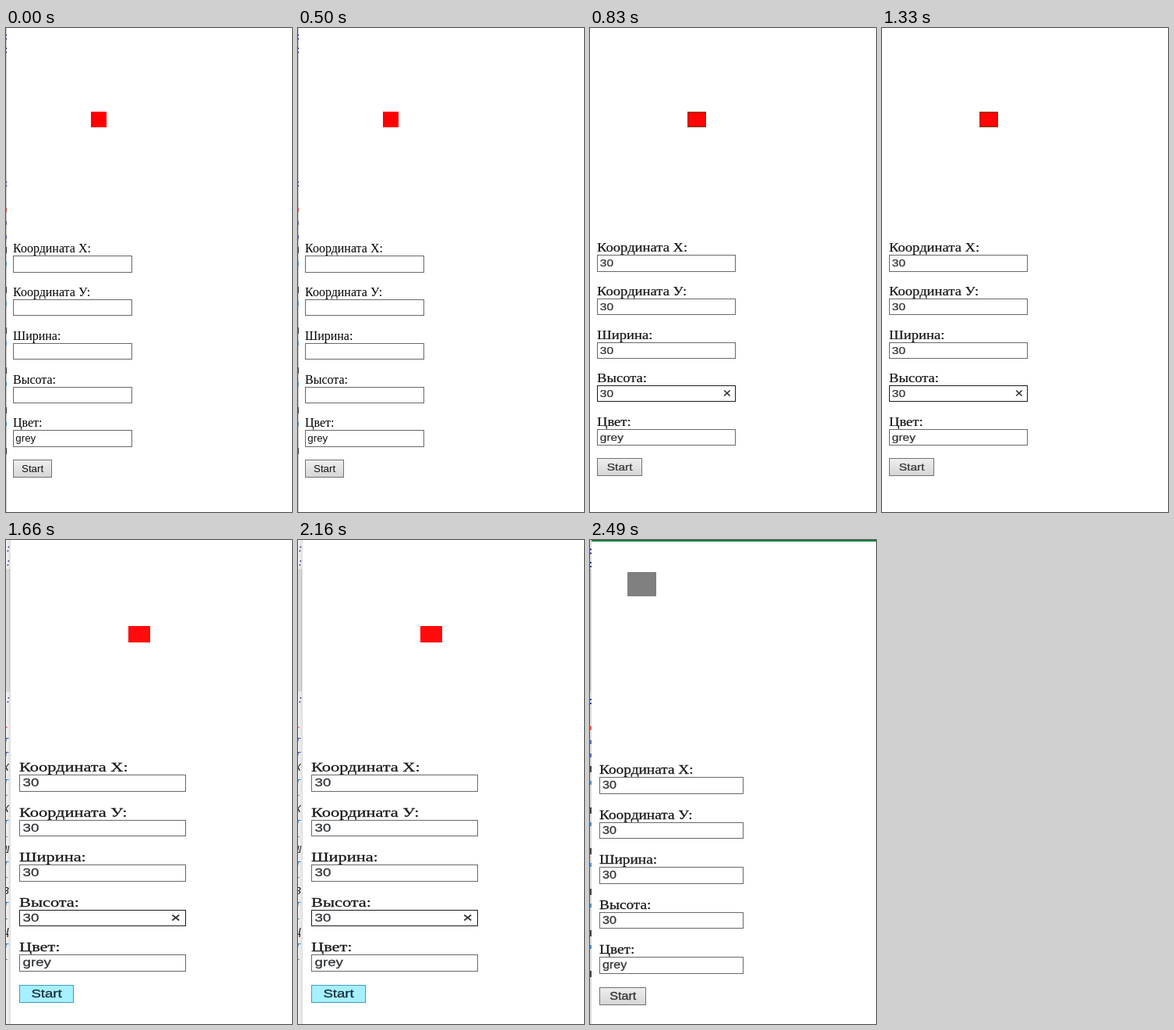
These frames come from a looping animation (367 by 619 pixels, 3.32 s). An HTML page:

```html
<!DOCTYPE html>
<html lang="ru">
<head>
<meta charset="utf-8">
<style>
html, body { margin: 0; width: 100%; height: 100%; overflow: hidden; background: #fff; }
svg { display: block; width: 100%; height: 100%; }
rect, line { shape-rendering: crispEdges; }
.label { font: 16px "Liberation Serif", "Times New Roman", serif; }
.value { font: 13.33px "Liberation Sans", Arial, sans-serif; }
.code { font: italic 13px "Liberation Mono", monospace; }
</style>
</head>
<body>
<svg id="stage" viewBox="0 0 367 619"></svg>
<script>
const LOOP = 3320;
const STEP = 830;
const LABELS = ["Координата X:", "Координата У:", "Ширина:", "Высота:", "Цвет:"];
const BOX_W = 153;
const BOX_H = 21.3;
const stage = document.getElementById("stage");

// x, top: first field; sx, sy: page zoom; code: first line and pitch of the strip behind
const scenes = [
  { x: 9, top: 291.25, sx: 1, sy: 1, pitch: 55.8, ink: "#111", num: "", weight: 0,
    square: [109, 107, 20, 20, "#f00"], edge: 1, code: [10.5, 17.1] },
  { x: 9, top: 290.3, sx: 1.163, sy: 0.997, pitch: 55.6, ink: "#333", num: "30", weight: 0.25, focus: true,
    square: [125, 107, 24, 20, "#ff0505", "#6b4a16"], edge: 0 },
  { x: 17, top: 300, sx: 1.399, sy: 1.03, pitch: 57.5, ink: "#2f3338", num: "30", weight: 0.25, focus: true, hover: true,
    square: [157, 110, 28, 21, "#ff0b0b"], edge: 6, code: [11, 17.5] },
  { x: 12, top: 303, sx: 1.209, sy: 1.03, pitch: 57.5, ink: "#333", num: "30", weight: 0.25, bar: true,
    square: [48, 41, 37, 31, "#808080"], edge: 2, code: [14, 17.45] }
];

const rect = (x, y, w, h, fill) =>
  `<rect x="${x}" y="${y}" width="${w}" height="${h}" fill="${fill}"/>`;

const frame = (x, y, w, h, fill, stroke) =>
  rect(x, y, w, h, stroke) + rect(x + 1, y + 1, w - 2, h - 2, fill);

function text(s, str, cls, x, y, fill) {
  return `<text class="${cls}" fill="${fill}" stroke="${fill}" stroke-width="${s.weight}" transform="translate(${x} ${y}) scale(${s.sx} ${s.sy})">${str}</text>`;
}

// Slice of the code editor visible beside the page
function strip(s) {
  const { edge } = s;
  if (!edge) return "";
  const [first, pitch] = s.code;
  const wide = edge > 4;
  let out = rect(0, 0, edge, 619, wide ? "url(#shade)" : edge > 1 ? "#dcdcdc" : "#c8c8c8");
  if (edge > 1) {
    out += rect(0, 37, edge - 1, 157, wide ? "#d8d8d8" : "#c4c4c4");
    out += `<line x1="${edge - 1.5}" x2="${edge - 1.5}" y1="38" y2="194" stroke="#aaa" stroke-dasharray="1 1"/>`;
  }
  for (let i = 0; i < 32; i++) {
    if (i > 1 && i < 11 || i === 12) continue;
    const y = first + i * pitch;
    const kind = i < 16 ? 1 : (i - 16) % 3;
    const color = i === 13 ? "#e33" : kind === 0 ? "#111" : i < 16 ? "#33479c" : "#2878b8";
    if (wide) {
      const glyph = i < 12 ? ":" : i === 13 ? "-" : kind === 0 ? "ККШВЦ"[(i - 16) / 3] || "" : kind === 1 ? "т" : "-";
      const x = glyph === ":" ? -1 : -4;
      out += `<text class="code" x="${x}" y="${y + 4}" fill="${color}">${glyph}</text>`;
    } else if (i < 12) {
      out += rect(0, Math.round(y - 3), edge, 2, color) + rect(0, Math.round(y + 2), edge, 2, color);
    } else if (kind < 2) {
      const h = kind === 0 ? 8 : 5;
      out += `<g opacity="0.75">${rect(0, Math.round(y - h / 2), edge, h, color)}</g>`;
    }
  }
  return `<g clip-path="url(#side)">${out}</g>`;
}

function form(s) {
  const w = Math.round(BOX_W * s.sx);
  let out = "";
  LABELS.forEach((label, i) => {
    const top = s.top + i * s.pitch;
    const y = Math.round(top);
    const h = Math.round(top + BOX_H * s.sy) - y;
    const active = s.focus && i === 3;
    out += text(s, label, "label", s.x, y - 4.3 * s.sy, s.weight ? "#181818" : "#000");
    out += frame(s.x, y, w, h, "#fff", active ? "#181a22" : "#686868");
    out += text(s, i < 4 ? s.num : "grey", "value", s.x + 3.3 * s.sx, y + 15 * s.sy, s.ink);
    if (active) {
      const cx = s.x + 143.5 * s.sx, cy = y + 10, r = 3.2 * s.sx;
      out += `<path d="M${cx - r} ${cy - 3.5}l${2 * r} 7m0-7l${-2 * r} 7" fill="none" stroke="#333" stroke-width="1.7"/>`;
    }
  });
  const y = Math.round(s.top + 260.8 * s.sy);
  out += frame(s.x, y, Math.round(50 * s.sx), 23, s.hover ? "#a6f0ff" : "url(#button)", s.hover ? "#3c9cc4" : "#707070");
  return out + text(s, "Start", "value", s.x + 11 * s.sx, y + 16 * s.sy, s.hover ? "#17293a" : s.ink);
}

function draw(s) {
  const [x, y, w, h, fill, stroke] = s.square;
  stage.innerHTML = `<defs>
    <linearGradient id="button" x2="0" y2="1"><stop stop-color="#eee"/><stop offset="1" stop-color="#d6d6d6"/></linearGradient>
    <linearGradient id="shade"><stop stop-color="#f4f4f4"/><stop offset="1" stop-color="#dedede"/></linearGradient>
    <clipPath id="side"><rect width="${s.edge}" height="619"/></clipPath></defs>`
    + rect(0, 0, 367, 619, "#fff")
    + strip(s)
    + (s.bar ? rect(2, 0, 365, 2, "#12813f") : "")
    + (stroke ? frame(x, y, w, h, fill, stroke) : rect(x, y, w, h, fill))
    + form(s);
}

let shown = -1;
function tick() {
  const index = Math.floor(performance.now() % LOOP / STEP);
  if (index !== shown) draw(scenes[shown = index]);
  requestAnimationFrame(tick);
}
tick();
</script>
</body>
</html>
```
